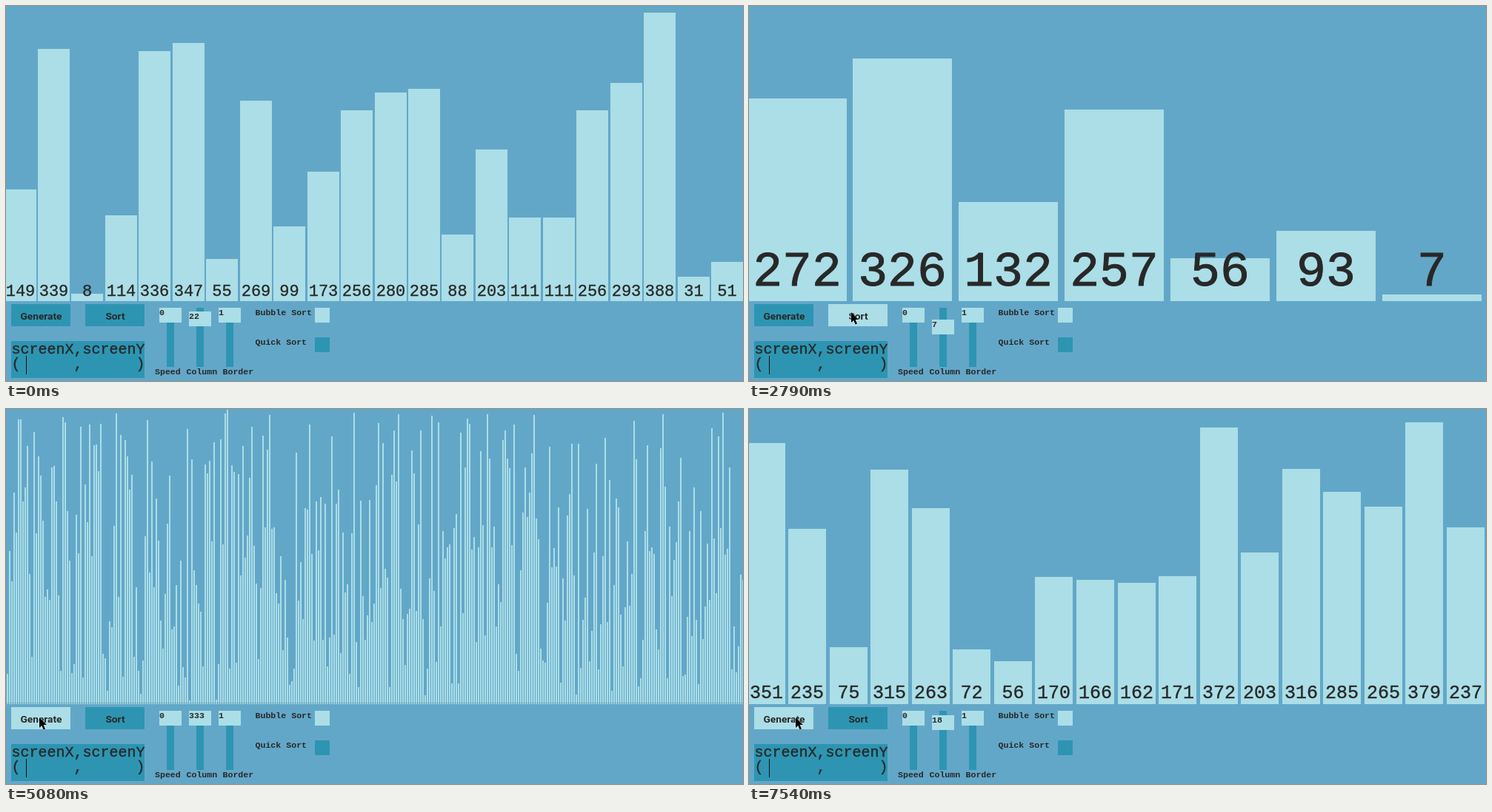
An HTML page with a canvas that plays this animation: 995 px wide and 507 px high, repeating every 8000 ms.

```html
<!DOCTYPE html>
<html lang="en">
<head>
<meta charset="utf-8">
<title>Sorting bars</title>
<style>
html, body { margin: 0; width: 100%; height: 100%; overflow: hidden; background: #63a7c8; }
canvas { display: block; }
</style>
</head>
<body>
<canvas id="stage" width="995" height="507"></canvas>
<script>
const ctx = document.getElementById('stage').getContext('2d');
const LOOP = 8000, FLOOR = 399;
const BG = '#63a7c8', LIGHT = '#abdee7', TEAL = '#2d95b2', INK = '#282828';
const MONO = '"Liberation Mono", "Courier New", monospace';
const SANS = 'Roboto, Arial, sans-serif';

// Seeded values for the dense set of columns
function randomValues(seed, count) {
  return Array.from({ length: count }, () => {
    seed = (seed * 1664525 + 1013904223) % 2 ** 32;
    return 3 + Math.floor(seed / 2 ** 32 * 395);
  });
}

// Each set shows from its start time on; values are the visible labels
const sets = [
  { from: 0, width: 43, size: 22, values: [149, 339, 8, 114, 336, 347, 55, 269, 99, 173, 256,
    280, 285, 88, 203, 111, 111, 256, 293, 388, 31, 51] },
  { from: 2150, width: 134, size: 66.5, values: [272, 326, 132, 257, 56, 93, 7] },
  { from: 5080, width: 2, size: 1.4, values: randomValues(20, 333) },
  { from: 7540, width: 51, size: 25, values: [351, 235, 75, 315, 263, 72, 56, 170, 166, 162,
    171, 372, 203, 316, 285, 265, 379, 237] }
];

// Eased pointer moves; between them it rests
const ENTER = { x: 713, y: 505 };
const moves = [
  { from: 70, to: 860, x: 261, y: 414 },     // to the slider
  { from: 1240, to: 1640, x: 261, y: 425 },  // drag down
  { from: 1720, to: 2010, x: 61, y: 421 },   // to Generate
  { from: 2550, to: 2790, x: 138, y: 414 },  // over Sort
  { from: 2790, to: 3240, x: 261, y: 432 },  // to the slider
  { from: 3570, to: 4200, x: 252, y: 403 },  // drag up
  { from: 4400, to: 4710, x: 45, y: 417 },   // to Generate
  { from: 5400, to: 5950, x: 258, y: 417 },  // to the slider
  { from: 6270, to: 6600, x: 261, y: 423 },  // drag down
  { from: 6880, to: 7280, x: 63, y: 417 }    // to Generate
];
const presses = [[860, 1680], [2090, 2320], [3390, 4330], [4860, 5080], [6270, 6650], [7430, 7540]];

const clamp = (v, lo, hi) => Math.min(hi, Math.max(lo, v));

function pointerAt(t) {
  let { x, y } = ENTER;
  for (const m of moves) {
    const u = clamp((t - m.from) / (m.to - m.from), 0, 1);
    const k = u * u * (3 - 2 * u);
    x += (m.x - x) * k;
    y += (m.y - y) * k;
  }
  return { x, y };
}

// The knob follows the pointer while it is pressed
function knobAt(t) {
  let y = 413;
  for (const [down, up] of presses) {
    if (t < down) break;
    const shift = pointerAt(Math.min(t, up)).y - pointerAt(down).y;
    y = clamp(y + Math.round(shift), 408, 468);
  }
  return y;
}

function rect(x, y, w, h, color) {
  ctx.fillStyle = color;
  ctx.fillRect(x, y, w, h);
}

function text(str, x, y, font, align = 'left', weight = 0) {
  ctx.font = font;
  ctx.textAlign = align;
  ctx.fillStyle = ctx.strokeStyle = INK;
  ctx.fillText(str, x, y);
  if (weight) {
    ctx.lineWidth = weight;
    ctx.lineJoin = 'round';
    ctx.strokeText(str, x, y);
  }
}

const label = (str, x, y) => text(str, x, y, 'bold 11.6px ' + MONO);

function drawBars({ values, width, size }) {
  const pitch = 1000 / values.length;
  values.forEach((v, i) => {
    const x = Math.floor(pitch * i - 2), top = FLOOR - 2 - v;
    rect(x, top, width, FLOOR - top, LIGHT);
    // Labels of the thinnest bars shrink to specks
    if (size < 3) rect(x, FLOOR - 2, width, 1, 'rgba(40,40,40,.25)');
    else text(v, x + width / 2, FLOOR - size * 0.31, size + 'px ' + MONO, 'center', size * 0.015);
  });
}

function drawButton(str, x, mouse) {
  const hover = mouse.x >= x && mouse.x < x + 80 && mouse.y >= 403 && mouse.y < 433;
  rect(x, 403, 80, 30, hover ? LIGHT : TEAL);
  text(str, x + 40.5, 424, 'bold 13.7px ' + SANS, 'center');
}

function drawSlider(name, nameX, x, y, value) {
  rect(x + 10, 408, 10, 80, TEAL);
  rect(x, y, 30, 20, LIGHT);
  label(value, x, y + 10);
  label(name, nameX, 498);
}

function drawOption(name, y, color) {
  label(name, 336.5, y + 10);
  rect(417, y, 20, 20, color);
}

function drawReadout(t) {
  rect(7, 453, 180, 50, TEAL);
  ['screenX,screenY', '(      ,      )'].forEach((line, i) =>
    text(line, 7.5, 470 + 20 * i, '20px ' + MONO, 'left', 0.4));
  rect(27, 473, 1, 25, '#101010');
  if ((t + 1026) % 1043 < 130) rect(117, 473, 1, 25, '#101010');
}

function drawPanel(t, mouse) {
  drawButton('Generate', 7, mouse);
  drawButton('Sort', 107, mouse);
  drawReadout(t);
  const y = knobAt(t);
  drawSlider('Speed', 201, 207, 408, 0);
  drawSlider('Column', 243.5, 247, y, Math.round(1000 / (3 + 8.7 * (y - 408))));
  drawSlider('Border', 292.5, 287, 408, 1);
  drawOption('Bubble Sort', 408, LIGHT);
  drawOption('Quick Sort', 448, TEAL);
}

const arrow = new Path2D('M0 0V14L3.2 11L5.6 16.4L8 15.4L5.6 10H10Z');

function drawPointer({ x, y }, pressed) {
  ctx.save();
  ctx.translate(x, y);
  ctx.lineWidth = 1;
  ctx.strokeStyle = 'rgba(255,255,255,.6)';
  ctx.stroke(arrow);
  ctx.fillStyle = '#000';
  ctx.fill(arrow);
  if (pressed) {
    ctx.fillStyle = 'rgba(222,222,20,.68)';
    ctx.beginPath();
    ctx.arc(0, 0, 12, 0, Math.PI * 2);
    ctx.fill();
  }
  ctx.restore();
}

function draw(t) {
  const mouse = pointerAt(t);
  const pressed = presses.some(([down, up]) => t >= down && t < up);
  rect(0, 0, 995, 507, BG);
  drawBars(sets.filter(s => t >= s.from).pop());
  drawPanel(t, mouse);
  if (t >= moves[0].from) drawPointer(mouse, pressed);
}

const begin = performance.now();
function tick() {
  draw((performance.now() - begin) % LOOP);
  requestAnimationFrame(tick);
}
tick();
</script>
</body>
</html>
```
